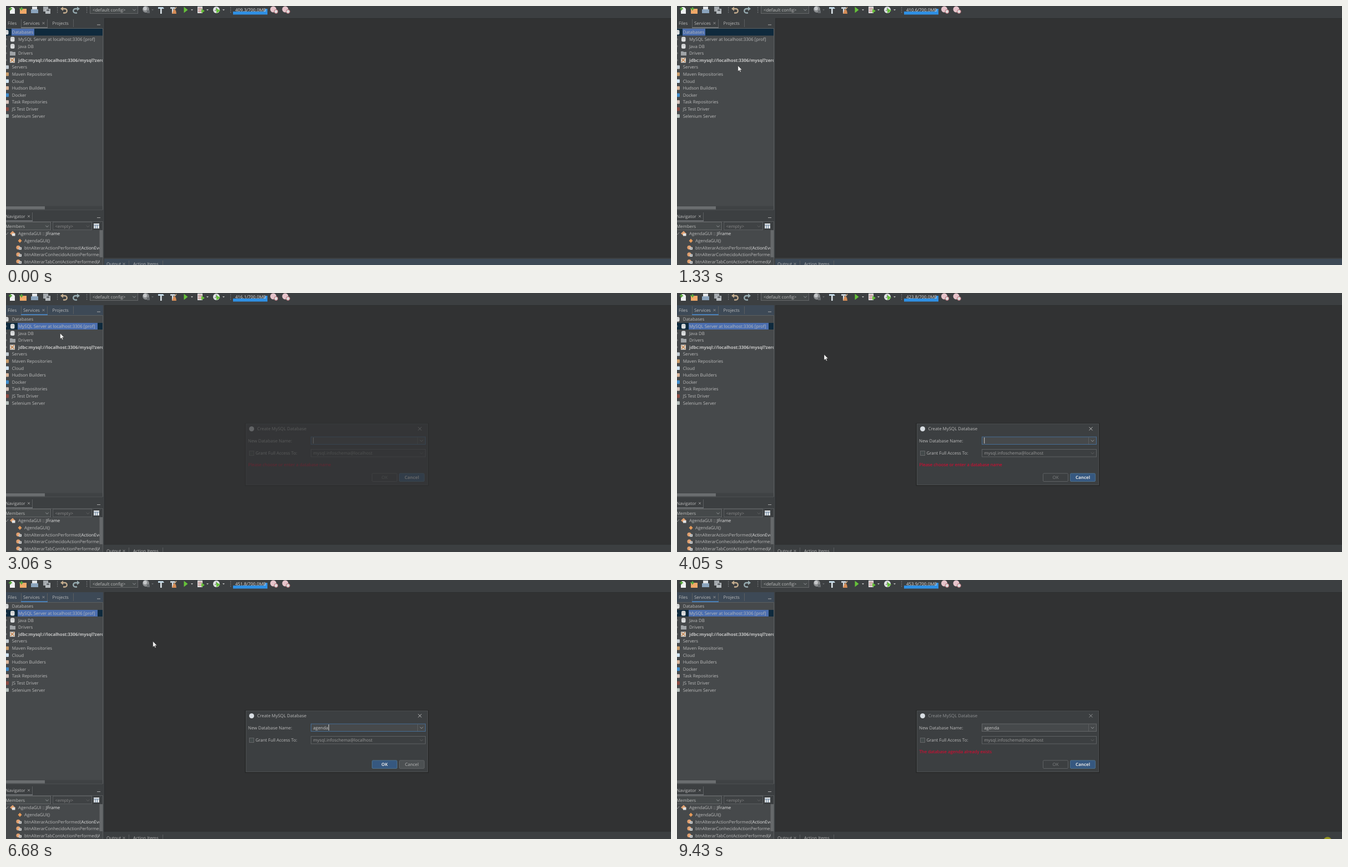
An HTML page for the animation above (9.47 s loop, 1198x468 px).

```html
<!DOCTYPE html>
<html lang="en">
<head>
<meta charset="utf-8">
<title>Create database</title>
<style>
html, body { margin: 0; width: 100%; height: 100%; overflow: hidden; background: #3c3f41; }
svg { display: block; width: 1198px; height: 468px; }
text { font: 7.9px "Open Sans", "Noto Sans", sans-serif; text-rendering: geometricPrecision; white-space: pre; }
.bold { font-weight: 700; }
</style>
</head>
<body>
<svg id="stage" viewBox="0 0 1198 468"></svg>
<script>
const LOOP = 9470;
const box = (x, y, w, h, fill, more = '') => `<rect x="${x}" y="${y}" width="${w}" height="${h}" fill="${fill}" ${more}/>`;
const frame = (x, y, w, h, fill, stroke, more = '') =>
  box(x + .5, y + .5, w - 1, h - 1, fill, `stroke="${stroke}" ${more}`);
// y is the middle of the line
const text = (x, y, s, fill = '#bbb', more = '') =>
  `<text x="${x}" y="${y + 2.9}" style="fill:${fill}" ${more}>${s}</text>`;
const dot = (x, y, r, fill, more = '') => `<circle cx="${x}" cy="${y}" r="${r}" fill="${fill}" ${more}/>`;
const path = (d, fill, more = '') => `<path d="${d}" fill="${fill}" ${more}/>`;
const line = (d, stroke = '#a0a3a5', w = 1) => path(d, 'none', `stroke="${stroke}" stroke-width="${w}"`);
const group = (id, s) => `<g id="${id}">${s}</g>`;
const chevron = (x, y, c) => line(`M${x - 2.7} ${y - 1.3}l2.7 2.7l2.7-2.7`, c, .9);
const cross = (x, y, r, c) => line(`M${x - r} ${y - r}l${2 * r} ${2 * r}m0-${2 * r}l-${2 * r} ${2 * r}`, c, .9);
const arrow = (x, c = '#bbb') => path(`M${x - 2} 6h4l-2 2.5z`, c);
const grip = x => [2, 5, 8, 11].map(y => box(x, y, 1.2, 1.2, '#8a8d8f')).join('');
const drum = (x, y) => box(x - 4, y - 4.3, 7.5, 8.6, '#dcdedf', 'rx="2.5"') + line(`M${x - 3.5} ${y - 1.8}q3.3 1.6 6.5 0`, '#aaa', .6);
const sep = (x, y, h) => box(x, y, 1, h, '#5b5e60');
const rowY = i => 47.5 + i * 12.6;

function toolbar() {
  return box(0, 0, 1198, 22, '#3c3f41') +
    path('M7 2h6l3 3v9h-9z', '#eef0f1') + path('M5 4h2v-2h2v2h2v2h-2v2h-2v-2h-2z', '#59a83e') +
    path('M25 4h5l1 1h6v9h-12z', '#f0a868') + path('M24 4h3v-2h2v2h2v2h-2v2h-2v-2h-3z', '#59a83e') +
    path('M47 1h9v6h-9z', '#e2e5e8') + path('M45 6h13v7h-13z', '#8ba4bd') +
    box(67, 1, 9, 9, '#a3a8ac') + box(71, 5, 9, 9, '#b5babe') + box(73, 6, 5, 3, '#666b70') +
    grip(92) + line('M101 5h5a3.7 3.7 0 0 1 0 7.5h-3', '#c4ad8e', 2.4) + path('M98 5l5-4v8z', '#c4ad8e') +
    line('M130 5h-5a3.7 3.7 0 0 0 0 7.5h3', '#98adb2', 2.4) + path('M133 5l-5-4v8z', '#98adb2') +
    grip(145) + frame(151, -1, 87, 15, '#45494a', '#646668') + text(156, 7, '&lt;default config&gt;') + chevron(231, 7) +
    dot(252, 6, 6, '#8a8d8f') + dot(250.5, 4.5, 3.4, '#c4c6c8') + box(254, 8, 5, 5, '#666a6d') + arrow(264, '#606366') +
    path('M274 2h9l2 3h-11z', '#c3d9e6') + box(278, 5, 2.6, 9, '#dde5ea') +
    path('M296 2h8l2 3h-10z', '#c3ccd2') + box(299, 5, 2.5, 9, '#d9dfe3') + line('M307 2l-4 5', '#c9a27c', 1.6) + path('M302 6l4 2l1 6h-8z', '#d58b55') +
    path('M320.5 1.5l7 5.5l-7 5.5z', '#66c23a') + arrow(335) +
    box(345, 1, 9, 12, '#e2e4e6') + line('M346 4h7m-7 3h7m-7 3h7', '#b0574e', 1.2) + path('M352 5l6 4l-6 4z', '#66c23a') + arrow(363) +
    dot(379, 7, 6, '#e0e3e4') + line('M379 7v-4M379 7l-3 2', '#555') + path('M379 4l7 4.5l-7 4.5z', '#66c23a') + arrow(392) +
    grip(404) + path('M409 10h56l2-5h4v10.500h-62z', '#2f90e4') + text(413, 7, '', '#e4e6e8', 'id="memory"') +
    [481.5, 503].map(x => dot(x, 6, 5.5, '#e6c4cb') + dot(x + 5, 10, 3.4, '#ddd', 'stroke="#b5616b"')).join('');
}

function services() {
  const names = ['Databases', 'MySQL Server at localhost:3306 [prof]', 'Java DB', 'Drivers',
    'jdbc:mysql://localhost:3306/mysql?zeroDateTimeBehavior', 'Servers', 'Maven Repositories', 'Cloud',
    'Hudson Builders', 'Docker', 'Task Repositories', 'JS Test Driver', 'Selenium Server'];
  const tints = ['#c3ccd3', '#c79a68', '#cfe3f2', '#d8b49a', '#3f8ccc', '#d5c3bc', '#8a4a42', '#b4bdba'];
  const rows = names.map((s, i) => {
    const inner = i > 0 && i < 5;
    return text(inner ? 22 : 10.7, rowY(i), s, i == 4 ? '#c6c6c6' : '#bbb', i == 4 ? 'class="bold"' : '') +
      (inner ? line(`M-.5 ${rowY(i) - 2}l2 2l-2 2`, '#999', .9) : '') +
      (i > 4 ? box(-2, rowY(i) - 3.2, 7, 6.5, tints[i - 5], 'rx="1"') : '');
  }).join('');
  return box(0, 22, 175, 18, '#3c3f41', 'id="tabs"') + text(3, 31, 'Files') + text(31, 31, 'Services') +
    cross(67.5, 31, 2, '#999') + text(83.5, 31, 'Projects') + sep(27, 24, 14) + sep(74, 24, 14) + sep(121, 24, 14) +
    box(27, 38.3, 48, 1.8, '#777b7e', 'id="underline"') + box(164, 33.5, 6, 1, '#aaa') +
    box(0, 41, 175, 327, '#46494b') + line('M0 40.5h174.5v327.5h-175', '#5b5e60') +
    `<g clip-path="url(#tree)">` +
    group('pickTop', box(0, 41, 175, 12.5, '#0f2a3d') + box(10, 41, 41, 12.5, '#4b6eaf')) +
    group('pickServer', box(0, 54, 175, 12, '#0f2a3d') + box(21, 54, 144, 12, '#4b6eaf')) +
    box(0, 54, 175, 12, '#4b6eaf', 'id="pickRow"') +
    drum(1, rowY(0)) + drum(12, rowY(1)) + drum(12, rowY(2)) +
    path('M7 82h4l1 1h5v6.5h-10z', '#a0a4a7') +
    box(7, 93.5, 9, 9, '#d9d5ce') + line('M8 95l7 6m0-7l-7 7', '#c2804a', 1.4) + rows + '</g>' +
    box(0, 361.5, 174, 6.5, '#3f4244') + box(0, 362, 70, 5.5, '#6a6d6f');
}

function navigator() {
  const bright = s => `<tspan style="fill:#e6e6e6">${s}</tspan>`;
  const method = (y, name) => dot(22, y - .5, 3.6, '#e0a070') + box(23, y - 1, 5, 4.5, '#d9dcde') +
    box(24.5, y, 2, 2, '#777') + text(33, y, `${name}ActionPerformed(${bright('ActionEvent')}`);
  return text(-1, 380, 'Navigator') + cross(41, 380, 2, '#999') + sep(47, 373, 15) + box(0, 387.5, 48, 1.6, '#777b7e') +
    box(164, 382, 6, 1, '#aaa') + line('M0 389.5h175', '#55585a') +
    frame(-2, 390, 83, 15, '#45494a', '#646668') + text(-1, 397.7, 'Members') + chevron(74, 398) +
    frame(84, 390, 71, 15, '#3f4244', '#5b5e60') + text(88.5, 397.7, '&lt;empty&gt;', '#888') + chevron(147.5, 398, '#666') +
    box(158, 393, 10, 9, '#dfe2e4') + line('M158 396h10m-7 0v6m3.5-6v6', '#4f6f8f', .9) +
    box(0, 405, 175, 63, '#46494b') + line('M174.5 390v78', '#5b5e60') + '<g clip-path="url(#members)">' +
    line('M-1 411l2 2l3-4', '#999', .9) + path('M7 411l5-4.5l5 5l-5 4z', '#e0a070') + box(11, 411, 5.5, 4.5, '#dfe2e4') +
    text(22, 411.5, 'AgendaGUI :: ' + bright('JFrame')) +
    path('M25 420.5l3.5 3.7l-3.5 3.7l-3.5-3.7z', '#e59a5a') + text(33, 424.2, 'AgendaGUI()') +
    method(436.8, 'btnAlterar') + method(449.4, 'btnAlterarConhecido') + method(462, 'btnAlterarTabCont') + '</g>' +
    box(168.5, 405, 5.5, 49, '#66696b');
}

const output = () => box(177, 457, 1021, 11, '#3c3f41', 'id="outputBar"') + text(181, 466, 'Output') +
  cross(212.5, 466, 2, '#999') + sep(221, 460, 8) + text(229, 466, 'Action Items') + sep(282, 460, 8);

function dialog() {
  const button = (id, x, w, s) => frame(x, 325.5, w, 15.5, '#4c5052', '#5e6060', `rx="1.5" id="${id}Box"`) +
    text(x + w / 2, 333.3, s, '#bbb', `id="${id}" text-anchor="middle"`);
  return group('dialog', box(430, 235, 332, 114, '#000', 'opacity=".15"') +
    frame(432, 236, 328, 111, '#3c3f41', '#4b4e50') + dot(442.5, 245.5, 4.5, '#d8dde2') +
    text(452.5, 245.5, 'Create MySQL Database', '#bbb', 'id="title"') + group('close', cross(745.5, 245.3, 3, '#ccc')) +
    text(436, 266.8, 'New Database Name:') + frame(549, 259.5, 207, 14.5, '#46494b', '#466d94', 'id="field"') +
    sep(741, 260.5, 12.5) + chevron(748.5, 267) + text(553.2, 266.8, '', '#c8c8c8', 'id="typed"') +
    box(553, 261, .9, 11, '#ddd', 'id="caret"') +
    frame(438, 285, 9, 9, '#43494a', '#646668') + text(449.5, 289.3, 'Grant Full Access To:') +
    frame(549, 282, 207, 14.5, '#3c3f41', '#5e6163') + text(553.2, 289.3, 'mysql.infoschema@localhost', '#999') + chevron(748.5, 289.5, '#666') +
    text(436.5, 310.3, '', '#f0002e', 'id="error"') +
    button('ok', 659, 46, 'OK') + button('cancel', 708, 46, 'Cancel'));
}

const stage = document.getElementById('stage');
stage.innerHTML = `<clipPath id="tree"><rect y="41" width="174" height="320"/></clipPath>
  <clipPath id="members"><rect y="405" width="168.5" height="63"/></clipPath>` +
  box(0, 0, 1198, 468, '#3c3f41') + toolbar() + box(177, 22, 1021, 433, '#313233') + line('M177.5 455v-432.5h1021', '#2b2d2e') +
  services() + navigator() + output() + dialog() + dot(0, 0, 7.7, '#000', 'id="ring" opacity=".7"') +
  path('M0 0v10.3l2.4-2.1l1.6 3.5l1.5-.7l-1.6-3.4h3.3z', '#fff', 'id="cursor" stroke="#222" stroke-width=".5"');

const el = {};
stage.querySelectorAll('[id]').forEach(e => el[e.id] = e);

// Each entry starts with its time in ms
const memory = [[0, '409.3'], [450, '410.6'], [1850, '416.1'], [3300, '423.8'], [4750, '451.2'], [6350, '451.8'], [7750, '453.4'], [9150, '453.9']];
const typing = [[0, 0], [4300, 1], [4460, 2], [4550, 3], [4640, 4], [4720, 5], [4800, 6], [5210, 5], [5380, 4], [5500, 4], [6510, 5], [6680, 6]];
const moves = [[80, 1158, 460], [240, 1080, 425], [640, 560, 245], [1010, 222, 132], [1330, 110, 108], [1620, 67, 58], [2400, 67, 58],
  [2800, 96, 72], [3140, 98, 73], [3720, 265, 111], [6680, 265, 111], [6880, 211, 78], [7280, 680, 363], [7440, 697, 333],
  [7930, 697, 333], [8250, 790, 345], [8570, 963, 375], [8890, 1192, 453]];
const clicks = [[1700, 1880, 66, 58, '#bebe14'], [2230, 2400, 66, 58, '#d62840'], [7480, 7640, 696, 333, '#bebe14'], [9390, LOOP, 1172, 472, '#bebe14']];

const latest = (list, t) => list.filter(k => k[0] <= t).pop();
const show = (id, on) => el[id].style.display = on ? '' : 'none';
const paint = (id, fill) => el[id].style.fill = fill;
const write = (id, s) => { if (el[id].textContent !== s) el[id].textContent = s; };

function position(t) {
  const i = moves.findIndex(m => m[0] > t);
  const [a, b] = [moves[i - 1], moves[i]], k = (t - a[0]) / (b[0] - a[0]);
  return [a[1] + (b[1] - a[1]) * k, a[2] + (b[2] - a[2]) * k];
}

function styleButton(id, main, enabled) {
  el[id].setAttribute('class', main ? 'bold' : '');
  paint(id, main ? '#e0e0e0' : enabled ? '#bbb' : '#808284');
  paint(id + 'Box', main ? '#365880' : enabled ? '#4c5052' : '#3c3f41');
  el[id + 'Box'].style.stroke = main ? '#4c708c' : '#5e6163';
}

function draw(t) {
  write('memory', latest(memory, t)[1] + '/700.0MB');

  const focused = t >= 1700;
  paint('tabs', focused ? '#3d4956' : '#3c3f41');
  paint('underline', focused ? '#4a88c7' : '#777b7e');
  paint('outputBar', focused ? '#3c3f41' : '#3d4956');
  show('pickTop', !focused);
  show('pickServer', focused);
  show('pickRow', t >= 2230 && t < 2960);

  show('dialog', t >= 3020);
  el.dialog.style.opacity = Math.min(1, Math.max(0, (t - 3020) / 140));
  const active = t < 9390, [key, count] = latest(typing, t);
  write('typed', 'agenda'.slice(0, count));
  const blinkFrom = Math.max(key, 3050);
  show('caret', active && Math.floor((t - blinkFrom) / 500) % 2 === 0);
  el.caret.setAttribute('x', 553.3 + (count ? el.typed.getComputedTextLength() + .4 : 0));
  paint('title', active ? '#bbb' : '#8f9193');
  el.close.style.opacity = active ? 1 : .65;
  el.field.style.stroke = active ? '#466d94' : '#646668';
  const error = t < 4300 ? 'Please choose or enter a database name' : t >= 7600 ? 'The database agenda already exists' : '';
  write('error', error);
  styleButton('ok', !error, !error);
  styleButton('cancel', !!error, true);

  const click = clicks.find(c => t >= c[0] && t < c[1]);
  show('ring', click);
  if (click) {
    el.ring.setAttribute('cx', click[2]);
    el.ring.setAttribute('cy', click[3]);
    paint('ring', click[4]);
  }
  const moving = t >= 80 && t < 8890;
  show('cursor', moving);
  if (moving) el.cursor.setAttribute('transform', `translate(${position(t)})`);
}

function tick() {
  draw(performance.now() % LOOP);
  requestAnimationFrame(tick);
}
tick();
</script>
</body>
</html>
```
